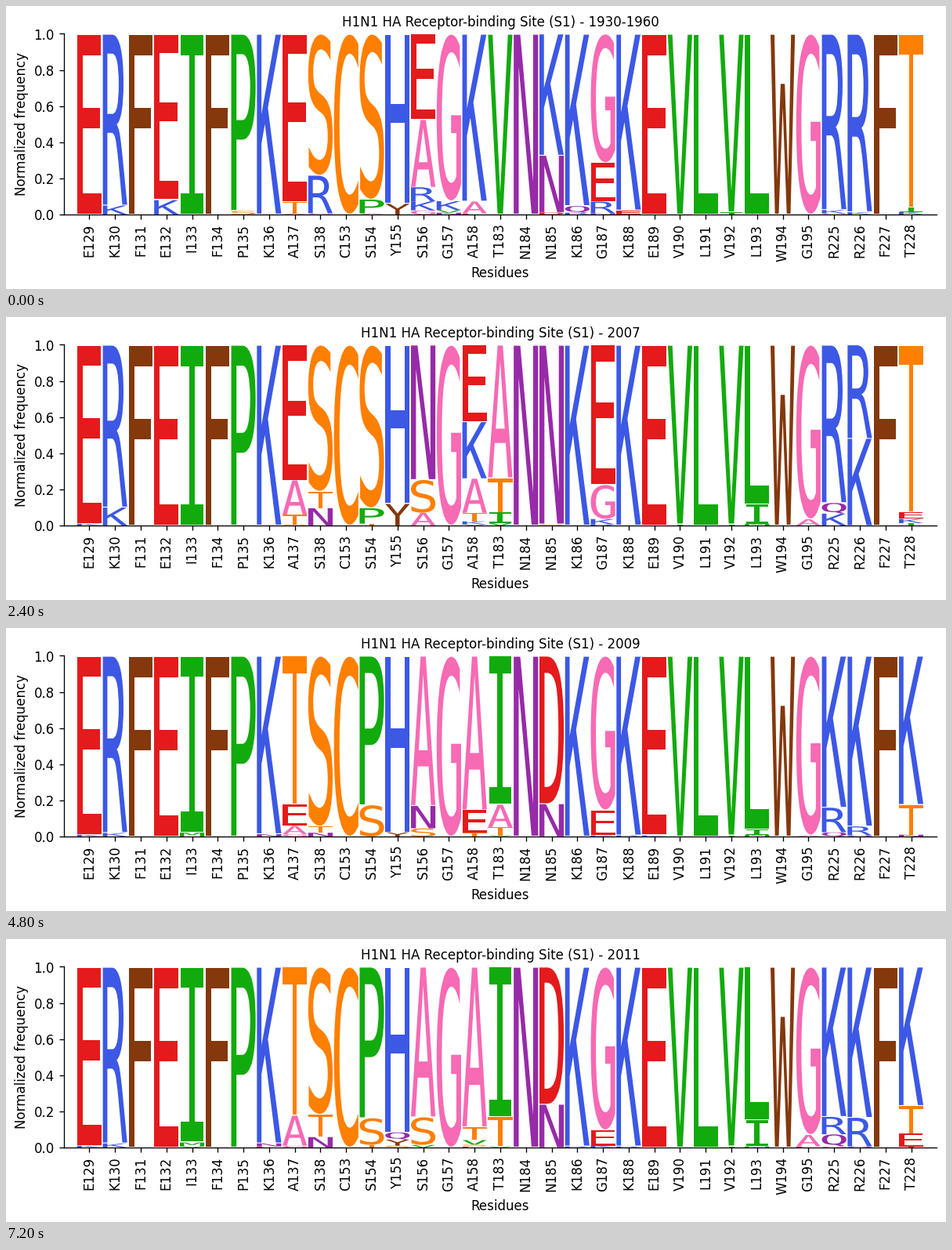
Write a matplotlib script that moves like this. It is 1200x361 px and loops after 8 s.

```python
import matplotlib.pyplot as plt
from matplotlib.animation import FuncAnimation
from matplotlib.patches import PathPatch
from matplotlib.textpath import TextPath
from matplotlib.transforms import Affine2D

W, H, DPI = 1200, 361, 120
LEFT, RIGHT, TOP, BOTTOM = 73.6, 1188.3, 35.5, 266
GLYPH_W, VPAD, TINY = 0.95, 0.01, 0.6

COLORS = {aa: color for group, color in {
    "GA": "#f76ab4", "STC": "#ff7f00", "VLIPM": "#12ab0d", "FYW": "#84380b",
    "HKR": "#3c58e5", "DE": "#e41a1c", "NQ": "#972aa8"}.items() for aa in group}

SITES = ("E129 K130 F131 E132 I133 F134 P135 K136 A137 S138 C153 S154 Y155 S156 "
         "G157 A158 T183 N184 N185 K186 G187 K188 E189 V190 L191 V192 L193 W194 "
         "G195 R225 R226 F227 T228").split()

# Residue that fills a site unless a period says otherwise
COMMON = dict(zip(SITES, "ERFEIFPKESCSHNGAANNKGKEVLVLWGRRFT"))

# Stacks from top to bottom in percent; the first residue takes what is left
PERIODS = {
    "1930-1960": """
        K130 R K5; E132 E K8; P135 P S2; A137 E T6.5 A; S138 S R21 G;
        S154 S P7.7 A; Y155 H Y6; S156 E A37.4 R7.8 K5 G2.3; G157 G K5 V1.4 N1;
        A158 K A6.6 E; T183 V; N185 K N31.5 D1.2; K186 K Q3.7 R1;
        G187 G E21.4 R6.6 N; K188 K E2.2; V192 V I1.2; R225 R K1.9 G;
        R226 R K1.3; T228 T I2.6 K1.4""",
    "1970-2006": """
        E129 E K; K130 R K12; E132 E K; I133 I M1.6 V; K136 K N E;
        A137 A E39 T10 G4.6 S1.8 D1.2 V; S138 S T14.2 N12.2 R3.7 P1 G;
        S154 S P30 A1 T; Y155 H Y35.2 Q; S156 A N30.4 S25 K6 E4 R1.8 D1;
        G157 G S; A158 A K40.5 T4.4 E3.3 V1.5 N1 G; T183 V T27 A17.4 I14.7 K;
        N185 N K7.9 R1 D; K186 K R1.2; G187 G E43.8 K7.5 R1.6 N; K188 K E;
        E189 E K; V190 V I; L191 L I; V192 V I; L193 L I22.8 M; G195 G A;
        R225 R K17.8 Q8.5 G1; R226 R K30 G; T228 T K25 E3 R1.3 I1""",
    "2007": """
        E129 E K1; K130 R K10; A137 E A19 T5.4 S; S138 S T9.2 N9.6;
        S154 S P8.6 T1; Y155 H Y12; S156 N S18.3 A7;
        A158 E K31.4 A19 T4.7 K1.7 V; T183 A T19 I5.9 V1.4; N185 N S;
        G187 E G18.9 K3 R; V190 V I; V192 V I; L193 L I10.8 M1; G195 G A3.5;
        R225 R Q5.9 K6.6; R226 R K48.2; T228 T E3.8 K2.4 I1.3""",
    "2008": """
        E129 E K1.3; K130 R K8.6; I133 I M1.5; K136 K R1;
        A137 E A20.4 T4.3 G1.8 S; S138 S T12.5 N10.8; S154 S P7.2 T1.2;
        Y155 H Y12.2; S156 N S19.3 A7.5; A158 E A18.5 T4.7 V3.9 K1.8;
        T183 A T20 I5.2 V2.2; G187 E G22.4 K2.8 R; E189 E K; V190 V I1;
        L193 L I14.2 M; G195 G A2.4; R225 R K8.4 Q7.4 G; R226 K R22.3;
        T228 T E3.9 I3.5 K2.7""",
    "2009": """
        E129 E K1; K130 R K2; I133 I M2.2; K136 K N1.3;
        A137 T E12 A4.6 G1.3; S138 S T3.4 N2.1; S154 P S17.4; Y155 H Y2.3;
        S156 A N12.5 S4.5; A158 A E12.6 T2; T183 I A12.5 T4.6 V; N185 D N18;
        G187 G E14 K; K188 K R; E189 E K; V192 V I; L193 L I3 M1; G195 G A;
        R225 K R13.7 Q2.3; R226 K R5 Q; T228 K T16.6 N1""",
    "2010": """
        E129 E K1; K130 R K2.3; I133 I M2.6; K136 K N1.9; A137 T A7.5 V1.3;
        S138 S T6.2 N3.9; S154 P S9 T; Y155 H Y3.3 Q; S156 A S8.6 V1.4;
        A158 A T4.4 V2.5; T183 I T9.3 V1.3; N185 D N13.5; G187 G E4.7 K1.9 R;
        K188 K R; E189 E K1.8; V192 V I; L193 L I6.6 M; G195 G A3;
        R225 K R6.5 Q3.8 G; R226 K R8.6 Q; T228 K T8.7 E2.8 I1""",
    "2011": """
        E129 E K1; K130 R K2.3; I133 I M2.2 V; K136 K N1.7 E; A137 T A16.7 G1;
        S138 S T12.4 N5.8; S154 P S14.9 T1.4; Y155 H Q4 Y3.4 S1;
        S156 A S15.4 V1.4; A158 A T7.2 V2.5 S1 E; T183 I T16.3 V;
        N185 D N23.8; K186 K R; G187 G E8.6 K1; K188 K R; V192 V I;
        L193 L I14.6 M; G195 G A6.4 E; R225 K R9.7 Q6.7 G; R226 K R15.9 Q;
        T228 K T15.4 E7.1 I""",
}
# Swept by the new strain from 2009 on
SWEPT = dict(zip("A137 S154 S156 T183 N185 R225 R226 T228".split(), "TPAIDKKK"))


def outline(aa):
    return TextPath((0, 0), aa, size=1, prop={"family": "DejaVu Sans Mono"})


OUTLINES = {aa: outline(aa) for aa in COLORS}
STRETCH = GLYPH_W / OUTLINES["E"].get_extents().width


def stacks(year):
    """Give (residue, height) pairs, top first, for each site."""
    tops = {**COMMON, **(SWEPT if year in ("2009", "2010", "2011") else {})}
    result = {site: [(aa, 1.0)] for site, aa in tops.items()}
    for entry in PERIODS[year].split(";"):
        site, top, *rest = entry.split()
        minor = [(r[0], float(r[1:] or TINY) / 100) for r in rest]
        result[site] = [(top, 1 - sum(h for _, h in minor))] + minor
    return result


def add_glyph(ax, aa, x, floor, height):
    """Stretch a letter into its cell, but never wider than an E."""
    path = OUTLINES[aa]
    box = path.get_extents()
    sx = min(GLYPH_W / box.width, STRETCH)
    sy = height * (1 - VPAD) / box.height
    place = (Affine2D().translate(-(box.x0 + box.x1) / 2, -box.y0)
             .scale(sx, sy).translate(x, floor + height * VPAD / 2))
    patch = PathPatch(place.transform_path(path), facecolor=COLORS[aa],
                      linewidth=0, visible=False)
    ax.add_patch(patch)
    return patch


def add_logo(ax, year):
    logo = []
    for x, site in enumerate(SITES):
        floor = 0
        for aa, height in reversed(stacks(year)[site]):
            logo.append(add_glyph(ax, aa, x, floor, height))
            floor += height
    return logo


plt.rcParams.update({"font.family": "DejaVu Sans", "font.size": 10})
fig = plt.figure(figsize=(W / DPI, (H + 0.001) / DPI), dpi=DPI, facecolor="white")
ax = fig.add_axes([LEFT / W, 1 - BOTTOM / H, (RIGHT - LEFT) / W, (BOTTOM - TOP) / H])
ax.set(xlim=(-1, len(SITES)), ylim=(0, 1))
ax.spines[["top", "right"]].set_visible(False)
ax.set_xticks(range(len(SITES)), SITES, rotation=90)
ax.set_yticks([0, 0.2, 0.4, 0.6, 0.8, 1])
ax.set_xlabel("Residues")
ax.set_ylabel("Normalized frequency")
title = ax.set_title("", fontsize=10)

years = list(PERIODS)
logos = [add_logo(ax, year) for year in years]

STEP, HOLD, LOOP = 400, 1200, 8000


def update(i):
    now = i * STEP // HOLD
    for k, logo in enumerate(logos):
        for patch in logo:
            patch.set_visible(k == now)
    title.set_text(f"H1N1 HA Receptor-binding Site (S1) - {years[now]}")
    return []


anim = FuncAnimation(fig, update, frames=LOOP // STEP, interval=STEP,
                     init_func=lambda: update(0), repeat=True, repeat_delay=0)
plt.show()
```
